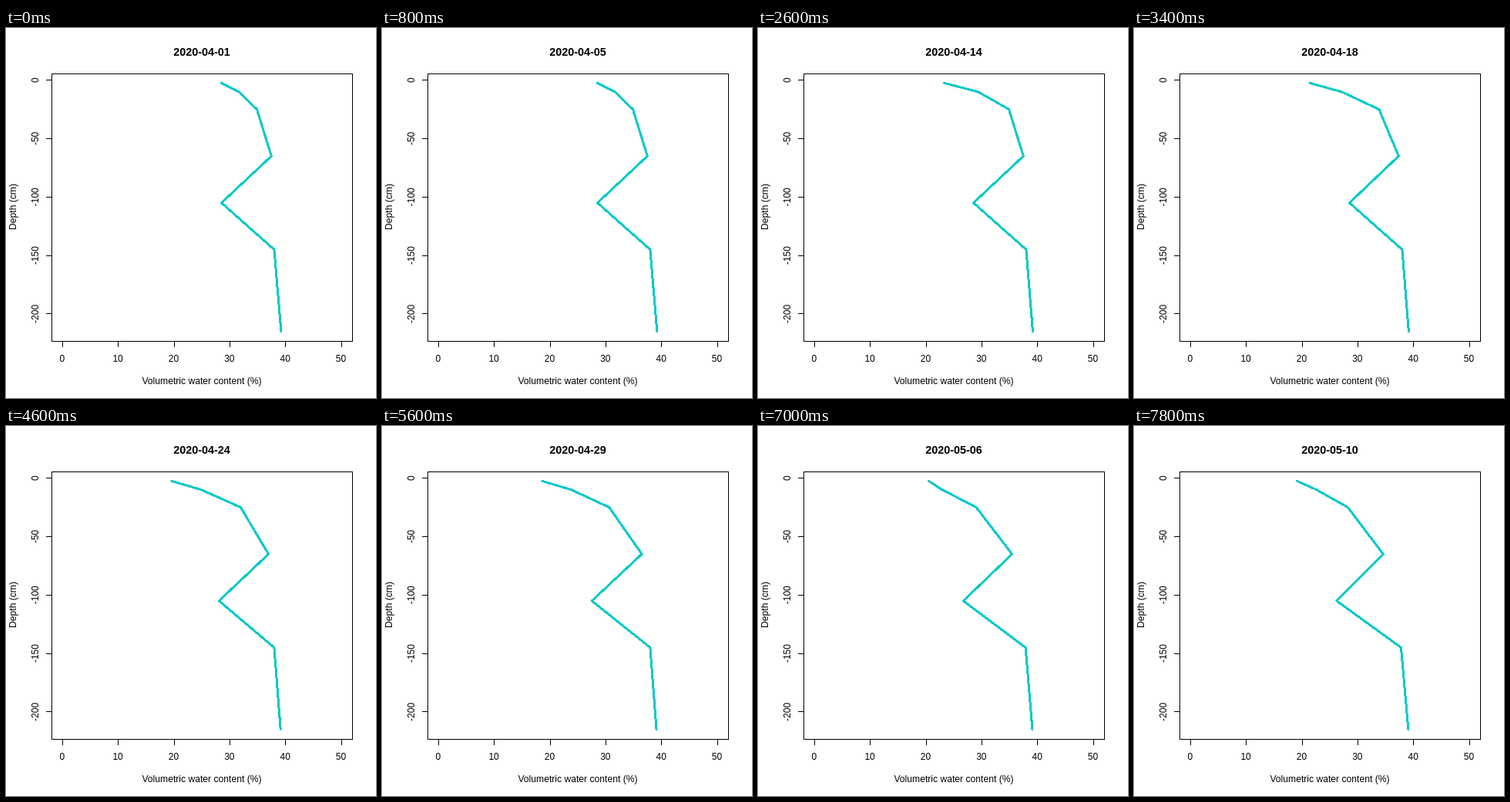
Recreate the animation shown at these times as an HTML page. Size 480x480 px, loop 8 s.

```html
<!DOCTYPE html>
<html lang="en">
<head>
<meta charset="utf-8">
<title>Soil water profile</title>
<style>
html, body { margin: 0; width: 100%; height: 100%; overflow: hidden; background: #fff; }
svg { display: block; width: 100%; height: 100%; }
text { font: 12px "Liberation Sans", Arial, sans-serif; text-anchor: middle; }
.title { font-size: 12.15px; }
#date { font-size: 14.4px; font-weight: bold; }
#axes, #line { fill: none; shape-rendering: crispEdges; }
#axes { stroke: #000; }
#line { stroke: #00c9c9; stroke-width: 3; stroke-linecap: round; stroke-linejoin: round; }
</style>
</head>
<body>
<svg viewBox="0 0 480 480">
  <rect width="480" height="480" fill="#fff"/>
  <path id="axes"/>
  <g id="labels"></g>
  <text id="date" x="254" y="36"></text>
  <polyline id="line"/>
</svg>
<script>
const STEP = 200, DAYS = 40;
const START = Date.UTC(2020, 3, 1);
const RAIN_DAY = 33;

// Each layer starts at `wet` % and loses `loss` % after day `from`;
// a positive `bend` slows the drying down, a negative one speeds it up.
const layers = [
  { depth: -2.5, wet: 28.45, loss: 11, from: 6, bend: 2.75, rain: 3.5 },
  { depth: -10, wet: 31.6, loss: 9, from: 10, bend: 2.6 },
  { depth: -25, wet: 34.85, loss: 6.65, from: 14, bend: 0.66 },
  { depth: -65, wet: 37.45, loss: 2.9, from: 14, bend: -1.8 },
  { depth: -105, wet: 28.5, loss: 2.3, from: 19, bend: -0.1 },
  { depth: -145, wet: 37.95, loss: 0.2, from: 28, bend: -1 },
  { depth: -215, wet: 39.2, loss: 0.15, from: 0, bend: 1 }
];

const $ = id => document.getElementById(id);
const px = water => 73.35 + 7.235 * water;
const py = depth => 67.6 - 1.5165 * depth;
const crisp = v => Math.floor(v) + 0.5;

function label(str, x, y, { turned = false, cls = "" } = {}) {
  const t = document.createElementNS("http://www.w3.org/2000/svg", "text");
  t.textContent = str;
  t.setAttribute("class", cls);
  t.setAttribute("transform", `translate(${x} ${y})` + (turned ? " rotate(-90)" : ""));
  $("labels").append(t);
}

function drawAxes() {
  let d = "M59.5 59.5H449.5V406.5H59.5Z";
  for (let v = 0; v <= 50; v += 10) {
    d += `M${crisp(px(v))} 406V414`;
    label(v, px(v) - 0.6, 433);
  }
  for (let v = 0; v >= -200; v -= 50) {
    d += `M52 ${crisp(py(v))}H60`;
    label(v, 42, py(v), { turned: true });
  }
  $("axes").setAttribute("d", d);
  label("Volumetric water content (%)", 254, 462, { cls: "title" });
  label("Depth (cm)", 13, 232, { turned: true, cls: "title" });
}

function waterAt({ wet, loss, from, bend, rain = 0 }, day) {
  const s = Math.max(0, (day - from) / (DAYS - 1 - from));
  const dried = loss * (1 - Math.exp(-bend * s)) / (1 - Math.exp(-bend));
  const rained = day < RAIN_DAY ? 0 : rain * Math.exp((RAIN_DAY - day) / 8);
  return wet - dried + rained;
}

function render(ms) {
  const day = Math.floor(ms / STEP) % DAYS;
  const points = layers.map(l => `${px(waterAt(l, day))},${py(l.depth)}`);
  $("date").textContent = new Date(START + day * 864e5).toISOString().slice(0, 10);
  $("line").setAttribute("points", points.join(" "));
}

drawAxes();
render(0);
const t0 = performance.now();
function tick() {
  render(performance.now() - t0);
  requestAnimationFrame(tick);
}
requestAnimationFrame(tick);
</script>
</body>
</html>
```
